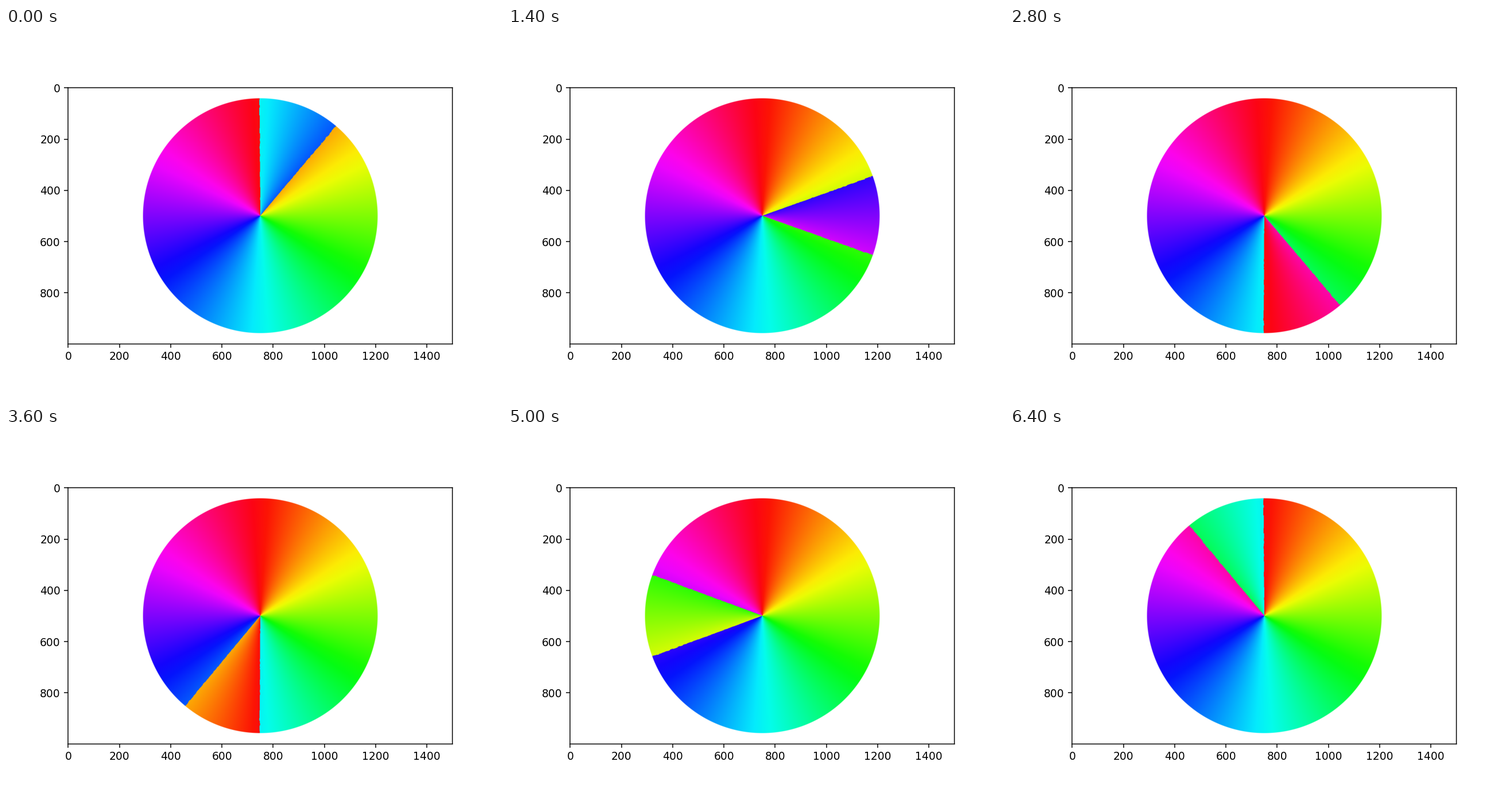
A matplotlib script that plays this animation: 864 px wide and 648 px high, repeating every 6.6 s.

```python
import numpy as np
import matplotlib.pyplot as plt
from matplotlib.animation import FuncAnimation

HEIGHT, WIDTH = 1000, 1500
CENTER_X, CENTER_Y, RADIUS = 749.5, 500.5, 457.5
FRAMES, INTERVAL = 33, 200
STEP, SPAN = 10, 40          # degrees per frame, width of the swapped sector
LOW, HIGH = 4, 252           # channel range of the wheel colours
BLUR = 4                     # degrees over which colour peaks are rounded
CELL = 10                    # size of the ragged steps along the sector edges

rng = np.random.default_rng(4)

y, x = np.mgrid[0:HEIGHT, 0:WIDTH]
dx, dy = x - CENTER_X, y - CENTER_Y
angle = np.degrees(np.arctan2(dx, -dy)) % 360   # clockwise from the top
cover = np.clip((RADIUS - np.hypot(dx, dy)) / 2 + 0.5, 0, 1)[..., None]


def hue_to_rgb(degrees):
    """Fully saturated colours, scaled to the wheel's channel range."""
    shift = np.array([0, 240, 120])
    distance = np.abs((degrees[..., None] + shift + 180) % 360 - 180)
    return LOW + (HIGH - LOW) * np.clip(2 - distance / 60, 0, 1)


def on_white(rgb):
    return np.rint(255 + (rgb - 255) * cover).astype(np.uint8)


def rough_hue():
    """Angle with a slight warp and blockwise jitter, for uneven edges."""
    jitter = rng.uniform(-0.2, 0.2, (HEIGHT // CELL, WIDTH // CELL))
    jitter = np.kron(jitter, np.ones((CELL, CELL)))
    return angle + 0.4 * np.cos(np.radians(3 * angle)) + jitter


colours = (hue_to_rgb(angle - BLUR) + hue_to_rgb(angle + BLUR)) / 2
wheel = on_white(colours)
opposite = on_white(LOW + HIGH - colours)
hue = rough_hue()


def picture(frame):
    in_sector = (hue - STEP * frame) % 360 < SPAN
    return np.where(in_sector[..., None], opposite, wheel)


fig, ax = plt.subplots(figsize=(6.4, 4.8), dpi=135)
image = ax.imshow(picture(0))

# Keep the frame and ticks at their exact sub-pixel places.
for spine in ax.spines.values():
    spine.set_snap(False)
for line in ax.get_xticklines() + ax.get_yticklines():
    line.set_snap(False)
ax.tick_params(axis="x", pad=3)


def update(frame):
    image.set_data(picture(frame))
    return [image]


animation = FuncAnimation(fig, update, frames=FRAMES, interval=INTERVAL,
                          repeat=True, repeat_delay=0)
plt.show()
```
